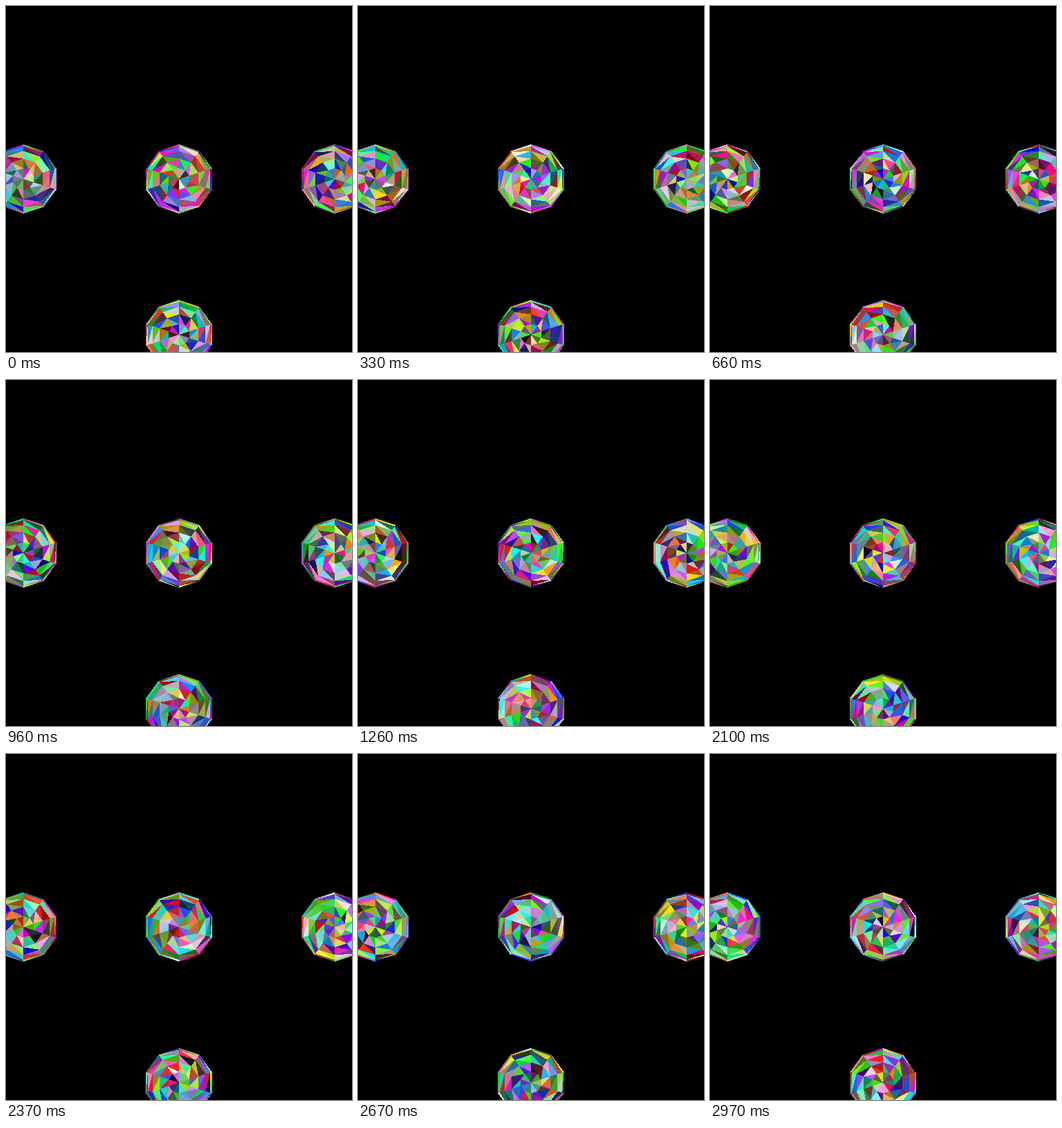
Write an HTML page with a canvas that moves like this. It is 500 px wide and 500 px high and loops after 3 s.

```html
<!DOCTYPE html>
<html lang="en">
<head>
<meta charset="utf-8">
<title>Flickering facets</title>
<style>
  html, body { margin: 0; width: 100%; height: 100%; overflow: hidden; background: #000; }
  canvas { display: block; width: 500px; height: 500px; image-rendering: pixelated; }
</style>
</head>
<body>
<canvas id="stage" width="500" height="500"></canvas>
<script>
const SIZE = 500, RADIUS = 50, SIDES = 10, BANDS = 5;
const STEP_MS = 30, STEPS = 100;
const FACETS = SIDES * BANDS * 2;
const CENTERS = [[25, 250], [250, 250], [475, 250], [250, 475]];

const ctx = document.getElementById('stage').getContext('2d');
const image = ctx.createImageData(SIZE, SIZE);
const pixels = new Uint32Array(image.data.buffer);
const BLACK = 0xff000000;

const sector = 2 * Math.PI / SIDES;
const half = sector / 2;
const ringRadius = k => RADIUS * Math.sin(k * Math.PI / (2 * BANDS));

// Facet of a sphere seen along its axis, or -1 outside the outline.
function facetAt(x, y) {
  const angle = (Math.atan2(x, -y) + 2 * Math.PI) % (2 * Math.PI);
  const s = Math.floor(angle / sector) % SIDES;
  const turn = angle - (s + 0.5) * sector;
  const dist = Math.hypot(x, y);
  const r = dist * Math.cos(turn) / Math.cos(half);
  if (r >= RADIUS) return -1;

  let k = 0;
  while (k < BANDS - 1 && r >= ringRadius(k + 1)) k++;
  const inner = ringRadius(k), outer = ringRadius(k + 1);
  const t = (r - inner) / (outer - inner);
  const diagonal = Math.sin(half) * (inner - t * (inner + outer));
  const side = k > 0 && dist * Math.sin(turn) > diagonal ? 1 : 0;
  return (k * SIDES + s) * 2 + side;
}

// Every covered pixel paired with its facet number.
const covered = [];
CENTERS.forEach(([cx, cy], ball) => {
  for (let y = cy - RADIUS; y < Math.min(SIZE, cy + RADIUS); y++) {
    for (let x = Math.max(0, cx - RADIUS); x < Math.min(SIZE, cx + RADIUS); x++) {
      const facet = facetAt(x + 0.5 - cx, y + 0.5 - cy);
      if (facet >= 0) covered.push([y * SIZE + x, ball * FACETS + facet]);
    }
  }
});

function randomColor(seed) {
  let h = Math.imul(seed + 1, 0x9e3779b1);
  h = Math.imul(h ^ (h >>> 16), 0x85ebca6b);
  h = Math.imul(h ^ (h >>> 13), 0xc2b2ae35);
  return (h ^ (h >>> 16) | BLACK) >>> 0;
}

function draw(step) {
  const total = CENTERS.length * FACETS;
  const colors = Array.from({ length: total }, (_, i) => randomColor(step * total + i));
  for (const [at, facet] of covered) pixels[at] = colors[facet];
  ctx.putImageData(image, 0, 0);
}

pixels.fill(BLACK);
const start = performance.now();
let shown = 0;
draw(0);

function tick() {
  const step = Math.floor((performance.now() - start) / STEP_MS) % STEPS;
  if (step !== shown) draw(shown = step);
  requestAnimationFrame(tick);
}
requestAnimationFrame(tick);
</script>
</body>
</html>
```
